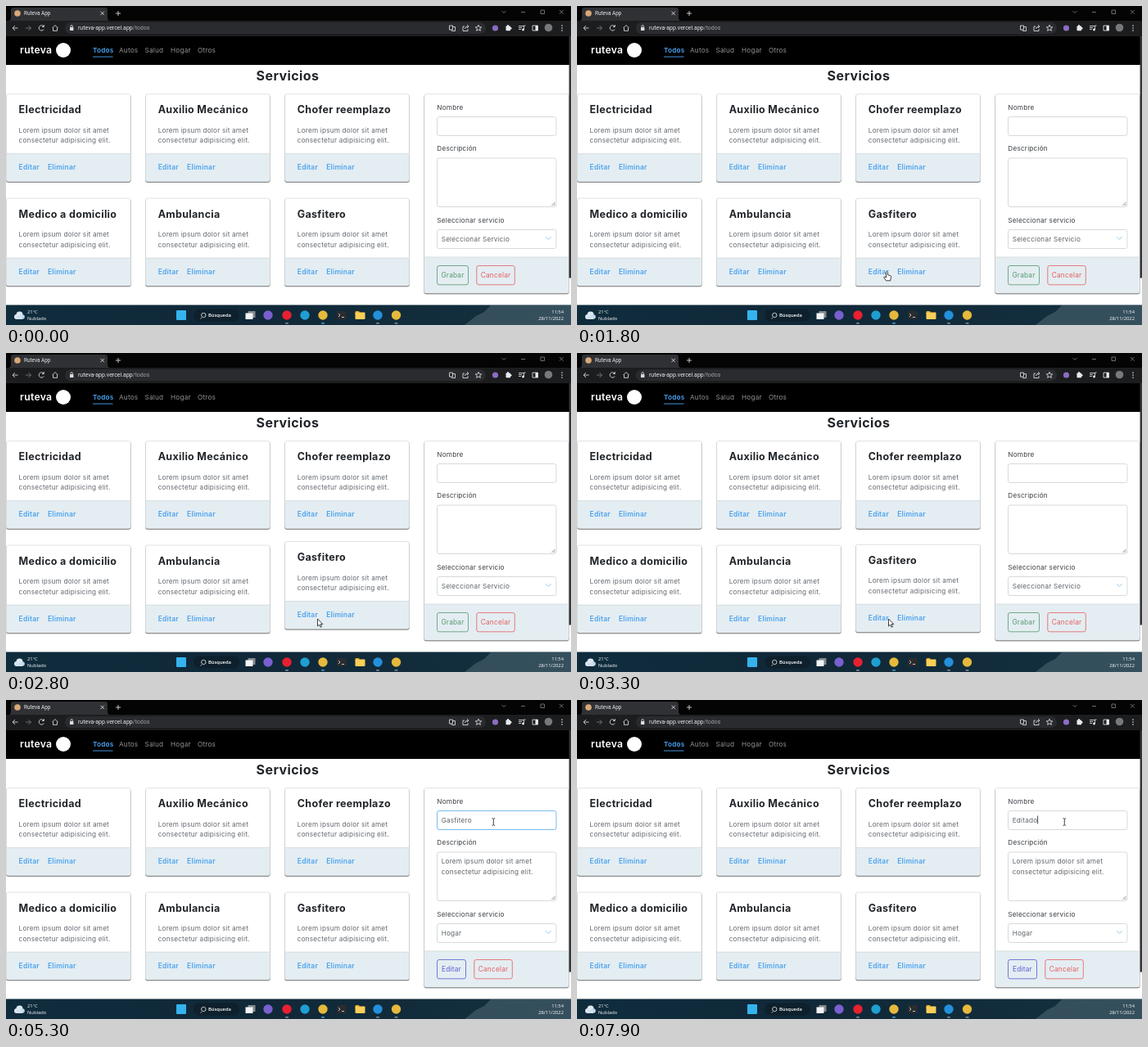
An HTML page that plays this animation: 690x390 px, repeating every 8 s.

```html
<!DOCTYPE html>
<html lang="es">
<head>
<meta charset="utf-8">
<title>Servicios</title>
<style>
  html, body { margin: 0; width: 100%; height: 100%; overflow: hidden; background: #fff; }
  svg { display: block; width: 100%; height: 100%; }
  text { font: 8.2px Inter, sans-serif; letter-spacing: .025em; white-space: pre; }
  .heading { font-size: 16px; font-weight: 700; fill: #212529; text-anchor: middle; }
  .title { font-size: 12.5px; font-weight: 700; fill: #212529; }
  .body { fill: #62686f; }
  .link { font-size: 8.5px; font-weight: 600; fill: #4ba3ee; }
  .label { fill: #3a3f44; }
  .field { fill: #5e646a; }
  .button { font-size: 8.3px; text-anchor: middle; }
  .brand { font-size: 12.2px; font-weight: 600; fill: #fff; }
  .nav { fill: #939393; }
  .chrome { font: 7px Roboto, sans-serif; letter-spacing: 0; fill: #e8eaed; }
  .task { font: 5.8px "Open Sans", sans-serif; letter-spacing: 0; fill: #fff; }
  .end { text-anchor: end; }
  .card { fill: #fff; stroke: #d3d6d9; stroke-width: .7; filter: drop-shadow(.7px 1.9px .6px #0008); }
  .box { fill: #fff; stroke: #d2d6da; stroke-width: .9; }
  .line { fill: none; stroke: #d5d7da; stroke-width: .9; }
  .dim { stroke: #77797c; }
</style>
</head>
<body>
<svg id="stage" viewBox="0 0 690 390">
  <defs>
    <linearGradient id="bar">
      <stop offset="0" stop-color="#0f2c3d"/><stop offset=".45" stop-color="#102838"/>
      <stop offset="1" stop-color="#14303f"/>
    </linearGradient>
  </defs>
</svg>
<script>
const stage = document.getElementById('stage');
const text = (x, y, str, cls, extra = '') => `<text x="${x}" y="${y}" class="${cls}" ${extra}>${str}</text>`;
const rect = (x, y, w, h, fill, rx = 0) => `<rect x="${x}" y="${y}" width="${w}" height="${h}" fill="${fill}" rx="${rx}"/>`;
const box = (x, y, w, h, cls = 'box', extra = '') =>
  `<rect x="${x}" y="${y}" width="${w}" height="${h}" rx="2.5" class="${cls}" ${extra}/>`;
const dot = (x, y, r, fill) => `<circle cx="${x}" cy="${y}" r="${r}" fill="${fill}"/>`;
const line = (d, cls = 'line') => `<path d="${d}" class="${cls}"/>`;

const lorem = ['Lorem ipsum dolor sit amet', 'consectetur adipisicing elit.'];
const footer = (x, y, w, h) =>
  rect(x + .5, y, w - 1, h, '#e4edf2', 2) + rect(x, y - .4, w, .8, '#d0d6da');

function browser() {
  return rect(0, 0, 690, 37, '#040404') + rect(0, 18, 690, 19, '#1c1d1f') +
    `<path d="M3 18Q6 18 6 14V5Q6 2 9 2H121Q124 2 124 5V14Q124 18 127 18Z" fill="#303134"/>` +
    dot(14, 9, 3.8, '#d9a878') + text(22, 11.3, 'Ruteva App', 'chrome', 'style="font-size:6.4px"') +
    line('M115.5 6.7l4.4 4.4M119.9 6.7l-4.4 4.4M134 9h6M137 6v6') +
    line('M605.5 6l2.5 2.5L610.5 6M629 7.5h5M653 5h4.5v4.5H653ZM676 5l4.6 4.6M680.6 5L676 9.6', 'line dim') +
    line('M14.5 27H8M11 24l-3 3 3 3') + line('M24 27h6.5M27.5 24l3 3-3 3', 'line dim') +
    line('M46 25a3.2 3.2 0 1 0 .2 3.4M46.3 23v2.5H44M56.5 27l3.5-3.5 3.5 3.5M57.5 26.5v3.8h5v-3.8') +
    rect(72, 20, 514, 14, '#2a2b2e', 7) +
    rect(78, 26, 4.4, 4, '#dadce0', .5) + line('M79 26v-1.3a1.2 1.2 0 0 1 2.4 0V26') +
    text(88, 29.4, 'ruteva-app.vercel.app<tspan fill="#9aa0a6">/todos</tspan>', 'chrome') +
    line('M541.5 24h4v5h-4ZM545.5 25.5h3v5h-4l-1-1.5M560 25h-2v5.5h6V28M560.5 28q0-3 4-3M563 23l2 2-2 2') +
    line('M577 23.2l1.1 2.5 2.7.2-2.1 1.7.7 2.7-2.4-1.5-2.4 1.5.7-2.7-2.1-1.7 2.7-.2Z') +
    dot(597.5, 27, 3.6, '#8a6cc4') +
    rect(610.5, 24.5, 5.6, 5.8, '#e8eaed', .8) + dot(613, 24.3, 1.2, '#e8eaed') + dot(616.3, 27.3, 1.2, '#e8eaed') +
    line('M626 24.5h6M626 26.5h4M626 28.5h3M632.5 24v5M632.5 24h2') + dot(631.5, 29, 1.4, '#e8eaed') +
    line('M643 24h6.5v6H643Z') + rect(646.5, 24, 3, 6, '#e8eaed') +
    dot(662.5, 26.5, 4.8, '#77797c') + [24, 27, 30].map(y => dot(679, y, .8, '#e8eaed')).join('');
}

function navbar() {
  const links = [[138, 'Autos'], [169.5, 'Salud'], [201, 'Hogar'], [234, 'Otros']];
  return rect(0, 37, 690, 35, '#000') + text(17, 58, 'ruteva', 'brand') + dot(70, 54, 9, '#fff') +
    text(106, 57, 'Todos', 'nav', 'style="fill:#4aa5f5;font-weight:600"') + rect(106, 61.6, 24.5, .9, '#4aa5f5') +
    links.map(([x, name]) => text(x, 57, name, 'nav')).join('');
}

function card(name, i) {
  const x = .3 + i % 3 * 170.1, y = 107.7 + Math.floor(i / 3) * 127.4;
  return `<g id="card${i}">` + box(x, y, 152, 106.8, 'card') + footer(x, y + 73, 152, 33.6) +
    text(x + 15.3, y + 23.6, name, 'title') +
    lorem.map((row, n) => text(x + 15.3, y + 47.2 + n * 12.2, row, 'body')).join('') +
    text(x + 15.3, y + 92.6, 'Editar', 'link') + text(x + 50.7, y + 92.6, 'Eliminar', 'link') + '</g>';
}

const button = (x, w, name, color) =>
  `<g fill="${color}">` + box(x, 317.5, w, 23.3, '', `style="fill:none;stroke:${color};stroke-width:.8"`) +
  text(x + w / 2, 332, name, 'button') + '</g>';

function form() {
  return box(510.7, 107.7, 176.6, 243.3, 'card') + footer(510.7, 307, 176.6, 43.8) +
    text(526.3, 126.6, 'Nombre', 'label') + text(526.3, 177.4, 'Descripción', 'label') +
    text(526.3, 264.6, 'Seleccionar servicio', 'label') +
    box(526.5, 135.5, 145.5, 23, 'box', 'id="nameBox"') +
    box(526.5, 186, 145.5, 59.5) + box(526.5, 273.5, 145.5, 23) +
    line('M666.5 244l4-4M669 244l1.5-1.5', 'line dim') +
    `<path d="M659.3 282.3l3.2 3.2 3.2-3.2" fill="none" stroke="#9cc9e6"/>` +
    text(531.7, 149.6, '', 'field', 'id="nameText"') +
    '<rect id="caret" y="141.5" width=".8" height="10" fill="#222"/>' +
    '<g id="emptyForm">' + text(531.7, 287.8, 'Seleccionar Servicio', 'field') +
    button(526.5, 38, 'Grabar', '#55996f') + button(574.8, 46.5, 'Cancelar', '#e55f5f') + '</g>' +
    '<g id="filledForm">' + lorem.map((row, n) => text(531.7, 200.4 + n * 12.2, row, 'field')).join('') +
    text(531.7, 287.8, 'Hogar', 'field') +
    button(526.5, 35, 'Editar', '#555cd0') + button(571.8, 46.5, 'Cancelar', '#e55f5f') + '</g>';
}

function taskbar() {
  const apps = [[320, '#7a5fd0'], [343, '#e8202f'], [365, '#1f9fd0'], [387, '#e6b93c'], [454, '#2490dc'], [476.5, '#e6b93c']];
  return rect(0, 365.5, 690, 24.5, 'url(#bar)') +
    '<path d="M560 390L574 379 584 374 592 366H690V390Z" fill="#5d7682" opacity=".45"/>' +
    dot(13, 380, 3, '#dce8f2') + dot(16.5, 377.5, 4, '#dce8f2') + dot(20, 380, 2.8, '#c3d8ea') + rect(13, 379, 7, 4, '#d0e0ee') +
    text(26, 376, '21°C', 'task') + text(26, 384, 'Nublado', 'task') +
    rect(208, 372, 12, 12, '#35b3ee', 1) +
    rect(229, 370.5, 56, 15, '#0e202c', 7.5) + line('M239 381l-1.5 1.5') +
    '<circle cx="241.3" cy="378" r="2.7" class="line"/>' +
    text(247, 380.3, 'Búsqueda', 'task', 'style="font-weight:600"') +
    rect(295.5, 373, 9, 8, '#83898e') + rect(292.5, 375.5, 9, 7.5, '#f2f4f5') +
    apps.map(([x, color]) => dot(x, 378, 5.7, color)).join('') +
    rect(404, 373, 11.5, 10, '#2a2c2e', 1) + line('M406 376l2 2-2 2M410 380.5h3') +
    rect(426.5, 373, 5, 4, '#e3a51e', 1) + rect(426.5, 374.5, 12, 8.5, '#fbcf57', 1) +
    [343, 387, 454, 476.5].map(x => rect(x - 2, 387.3, 4, 1.2, x === 387 ? '#55b8f0' : '#9aa5ad', .6)).join('') +
    text(681, 376, '11:54', 'task end') + text(681, 384, '28/11/2022', 'task end');
}

// Every pointer has its hot spot at 0,0.
const pointers = `<g id="pointer" stroke="#111" stroke-width=".8" stroke-linejoin="round" fill="#fff">
  <path id="arrow" d="M0 0V9L2.1 7.1 3.5 10.2 5 9.5 3.6 6.5H6.3Z"/>
  <path id="hand" d="M-1 1Q0-.6 1 1V4.5L4 5.2Q5.2 5.6 5 7L4.2 11.5H-1L-3.8 7.6Q-3.5 6.2-2.3 6.8L-1 7.8Z"/>
  <path id="beam" fill="none" d="M-1.8-4.2H-.5L0-3.7.5-4.2H1.8M0-3.7V3.7M-1.8 4.2H-.5L0 3.7.5 4.2H1.8"/>
</g>`;

const services = ['Electricidad', 'Auxilio Mecánico', 'Chofer reemplazo', 'Medico a domicilio', 'Ambulancia', 'Gasfitero'];
stage.insertAdjacentHTML('beforeend', rect(0, 72, 690, 294, '#fff') + browser() + navbar() +
  text(344, 90.7, 'Servicios', 'heading') + services.map(card).join('') + form() +
  rect(687.6, 37, 2.4, 295.5, '#30343a') + taskbar() + pointers);

const part = id => document.getElementById(id);
const show = (id, on) => part(id).setAttribute('visibility', on ? 'visible' : 'hidden');
const clamp = v => Math.min(1, Math.max(0, v));
const ease = (t, from, to) => { const p = clamp((t - from) / (to - from)); return p * p * (3 - 2 * p); };
const mix = (a, b, p) => a + (b - a) * p;

const LOOP = 8000, FILL = 3700;
const keyTimes = [6900, 7100, 7200, 7400, 7500, 7700, 7900];

function nameAt(t) {
  if (t < FILL) return '';
  if (t < 5600) return 'Gasfitero';
  if (t < 6900) return 'Gasfitero'.slice(0, Math.max(0, 8 - Math.max(0, Math.floor((t - 5945) / 55))));
  return 'Editado'.slice(0, keyTimes.filter(k => t >= k).length);
}

function pointerAt(t) {
  if (t < 1800) {
    const p = ease(t, 900, 1700);
    return ['arrow', mix(545, 378, p), mix(384, 326, p)];
  }
  if (t < 2300) return ['hand', 378.5, 324.3];
  if (t < 3500) return ['arrow', 380.5, 325];
  const p = ease(t, 4100, 4800), x = mix(380.5, 595.3, p), y = mix(325, 149, p);
  if (p === 0) return ['hand', x, y];
  return [x > 526 && y < 158.5 ? 'beam' : 'arrow', x, y];
}

function draw(t) {
  const bob = clamp((t - 2300) / 1170);
  part('card5').setAttribute('transform', `translate(0 ${-2.45 * (1 - Math.cos(2 * Math.PI * bob))})`);

  show('emptyForm', t < FILL);
  show('filledForm', t >= FILL);
  const name = part('nameText');
  name.textContent = nameAt(t);
  const focus = ease(t, 5000, 5300) * (1 - ease(t, 6550, 6700));
  part('nameBox').style.stroke = `rgb(${mix(210, 105, focus)} ${mix(214, 180, focus)} ${mix(218, 232, focus)})`;
  part('caret').setAttribute('x', 531.7 + (name.textContent ? name.getComputedTextLength() : 0));
  show('caret', (t >= 5800 && t < 6400) || t >= 6900);

  const [shape, x, y] = pointerAt(t);
  part('pointer').setAttribute('transform', `translate(${x} ${y})`);
  for (const id of ['arrow', 'hand', 'beam']) show(id, id === shape && t >= 900);
}

const start = performance.now();
function tick() {
  draw((performance.now() - start) % LOOP);
  requestAnimationFrame(tick);
}
tick();
</script>
</body>
</html>
```
